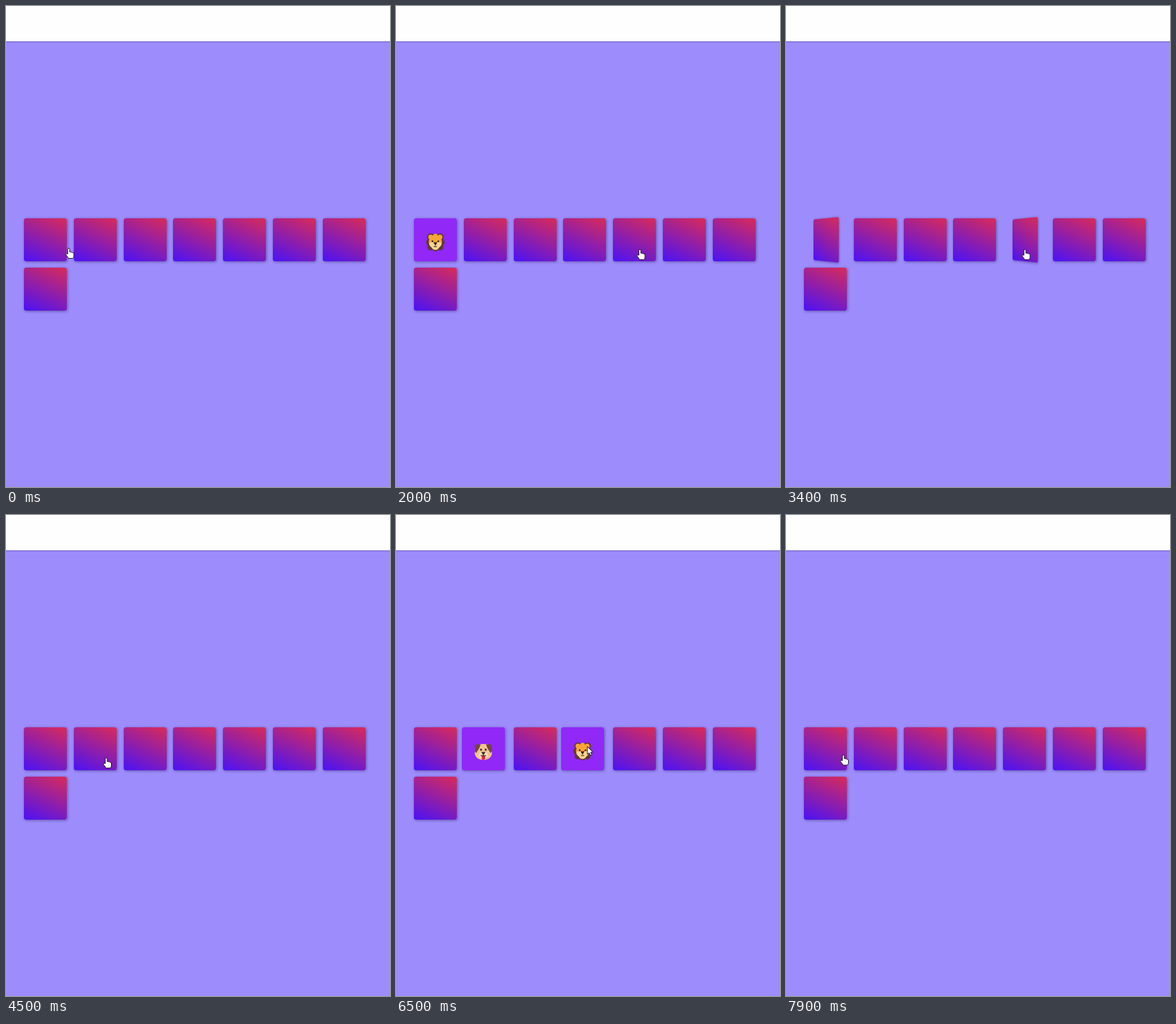
Animation, 600 px wide and 750 px high, one loop 8000 ms. Source, as an HTML page:

```html
<!DOCTYPE html>
<html lang="en">
<head>
<meta charset="utf-8">
<title>Memory cards</title>
<style>
  html, body { margin: 0; width: 100%; height: 100%; overflow: hidden; background: #9d8cfc; }
  #stage { position: relative; width: 600px; height: 750px; overflow: hidden; background: #9d8cfc; }
  header { height: 54.5px; background: #fffefe; box-shadow: 0 1px 2px rgba(0, 0, 0, .28); }
  .slot { position: absolute; width: 67px; height: 67px; perspective: 450px; }
  .card { width: 100%; height: 100%; transform-style: preserve-3d; }
  .face {
    position: absolute; inset: 0; border-radius: 3.5px; backface-visibility: hidden;
    box-shadow: 1px 1px 4px rgba(20, 10, 60, .45);
  }
  .back { background: linear-gradient(25deg, #4b12f5, #d92b58); }
  .front { background: #9128f7; transform: rotateY(180deg); }
  .front svg { position: absolute; left: 19px; top: 23px; width: 29px; height: 29px; }
  #cursor { position: absolute; left: 0; top: 0; width: 20px; height: 24px; overflow: visible; }
  #cursor path { fill: #fff; stroke: #16131f; stroke-width: 1; stroke-linejoin: round; }
</style>
</head>
<body>
<div id="stage">
  <header></header>
  <svg id="cursor">
    <path id="hand" d="M-1.4 8.6V1.2a1.5 1.5 0 0 1 3 0V5.5q1.4-.8 2.2.5 1.5-.7 2.2.6 2-.5 2 1.4V11.5Q8 14 6.6 15.5H-.5Q-1 13.5-4.1 10.2-5 8.4-3.3 8z"/>
    <path id="arrow" d="M0 0V12.2L2.8 9.8 4.7 14 6.9 13 5.1 9H8.8Z"/>
  </svg>
</div>
<script>
const LOOP = 8000, STEP = 100, FLIP = 250, SHAKE = 350;

const icons = {
  lion: `<g fill="#5c3936">
      <circle cx="7" cy="6" r="5.5"/><circle cx="21" cy="6" r="5.5"/>
      <circle cx="4.8" cy="14" r="4.8"/><circle cx="23.2" cy="14" r="4.8"/>
      <circle cx="7" cy="21" r="5"/><circle cx="21" cy="21" r="5"/>
      <circle cx="14" cy="22.5" r="5"/><rect x="6" y="3" width="16" height="20"/></g>
    <g fill="#f8a536"><circle cx="7" cy="6" r="3.6"/><circle cx="21" cy="6" r="3.6"/>
      <circle cx="14" cy="5" r="3.8"/><ellipse cx="14" cy="13.5" rx="10" ry="10.2"/></g>
    <path fill="#fcd58f" d="M5 15q4-3 7 0l2 3 2-3q3-3 7 0 1 4-3 6-2 4.5-6 4.5T8 21q-4-2-3-6z"/>
    <path fill="#2f2127" d="M11 14h6l-2 3.5h-2z"/>
    <circle cx="9.6" cy="12.5" r="1.3" fill="#2f2127"/><circle cx="18.4" cy="12.5" r="1.3" fill="#2f2127"/>
    <path fill="none" stroke="#2f2127" d="M14 17v2m-2.5 1q2.5 1.2 5 0"/>`,
  fox: `<path fill="#352b35" d="M3.5 7 6 1.2Q9 .5 10 6zM24.500 7 22 1.200Q19 .5 18 6z"/>
    <path fill="#f36a1d" d="M3 6q4-2 7-.5h8q3-1.500 7 .5v13H3z"/>
    <path fill="#fbdcb5" d="M1 18q7-3 11 1l2 1 2-1q4-4 11-1-1 5-5 8-8 4.500-16 0-4-3-5-8z"/>
    <path fill="#35262c" d="M11.500 18h5L14 21.500z"/>
    <circle cx="9.500" cy="16" r="1.300" fill="#35262c"/><circle cx="18.500" cy="16" r="1.300" fill="#35262c"/>
    <path fill="none" stroke="#35262c" stroke-width="1.200" d="M14 21v2m-4 2q2-2.500 4-2t4 2"/>`,
  dog: `<path fill="#f1c58d" d="M6 4q8-2 16 0l5 12q0 6-5 9-8 4-16 0-5-3-5-9z"/>
    <path fill="#774343" d="M2 3.500h8L7.500 10 3 17Q-.500 11 2 3.500zM26 3.500h-8L20.500 10 25 17Q28.500 11 26 3.500z"/>
    <path fill="#fbdfb5" d="M14 14q5 0 7 6 0 5-7 5t-7-5q2-6 7-6z"/>
    <path fill="#de2946" d="M11.500 20h5v5.500q-2.500 3-5 0z"/>
    <path fill="#33262b" d="M10.800 15h6.400L15 18.500h-2z"/>
    <circle cx="10.500" cy="11.500" r="1.500" fill="#33262b"/><circle cx="17.500" cy="11.500" r="1.500" fill="#33262b"/>
    <path fill="none" stroke="#33262b" d="M14 18v2.300m-4-.3q2 1.500 4 .3 2 1.200 4-.3"/>`
};

// One entry per turned card: its slot, when it opens and when it closes.
const turns = [
  { slot: 0, icon: "lion", open: 550, close: 3225 },
  { slot: 4, icon: "fox", open: 2025, close: 3225 },
  { slot: 1, icon: "dog", open: 4650, close: 7255 },
  { slot: 3, icon: "lion", open: 6055, close: 7255 }
];
const shakes = [2425, 6455];
const arrows = [[2300, 3300], [6300, 7300]];

// Pointer path: time, x, y of the hotspot.
const path = [
  [0, 98, 378], [400, 85.5, 378], [1300, 85.5, 378], [1900, 381, 380], [3300, 381, 380],
  [4200, 156.500, 379], [5450, 156.500, 379], [5950, 299, 361], [7100, 299, 361],
  [7900, 89.500, 374.500], [8000, 89.500, 374.500]
];
const swing = [[0, 0], [.2, -4.300], [.4, 4.300], [.6, -2.700], [.8, 2.700], [1, 0]];

const $ = id => document.getElementById(id);
const clamp = v => Math.max(0, Math.min(1, v));
const ease = v => v * v * (3 - 2 * v);

function along(keys, t) {
  const i = Math.max(1, keys.findIndex(k => k[0] >= t));
  const a = keys[i - 1], b = keys[i];
  const p = ease(clamp((t - a[0]) / (b[0] - a[0])));
  return a.slice(1).map((v, n) => v + (b[n + 1] - v) * p);
}

const cards = Array.from({ length: 8 }, (_, i) => {
  const slot = document.createElement("div");
  const turn = turns.find(c => c.slot === i);
  slot.className = "slot";
  slot.style.left = 28 + i % 7 * 77.75 + "px";
  slot.style.top = 330.700 + Math.floor(i / 7) * 77.75 + "px";
  slot.innerHTML = `<div class="card"><div class="face back"></div><div class="face front">${
    turn ? `<svg viewBox="0 0 28 28">${icons[turn.icon]}</svg>` : ""}</div></div>`;
  $("stage").insertBefore(slot, $("cursor"));
  return slot.firstChild;
});

function draw(t) {
  for (const { slot, open, close } of turns) {
    const angle = 180 * (clamp((t - open) / FLIP) - clamp((t - close) / FLIP));
    const start = shakes.find(s => s > open && s < close);
    const shift = along(swing, clamp((t - start) / SHAKE))[0];
    cards[slot].parentNode.style.transform = `translateX(${shift}px)`;
    cards[slot].style.transform = `rotateY(${-angle}deg)`;
  }
  const [x, y] = along(path, t);
  const arrow = arrows.some(([from, to]) => t >= from && t < to);
  $("cursor").style.transform = `translate(${x}px, ${y}px)`;
  $("arrow").style.display = arrow ? "" : "none";
  $("hand").style.display = arrow ? "none" : "";
}

const began = performance.now();
function tick() {
  const t = (performance.now() - began) % LOOP;
  draw(Math.floor(t / STEP) * STEP);
  requestAnimationFrame(tick);
}
tick();
</script>
</body>
</html>
```
